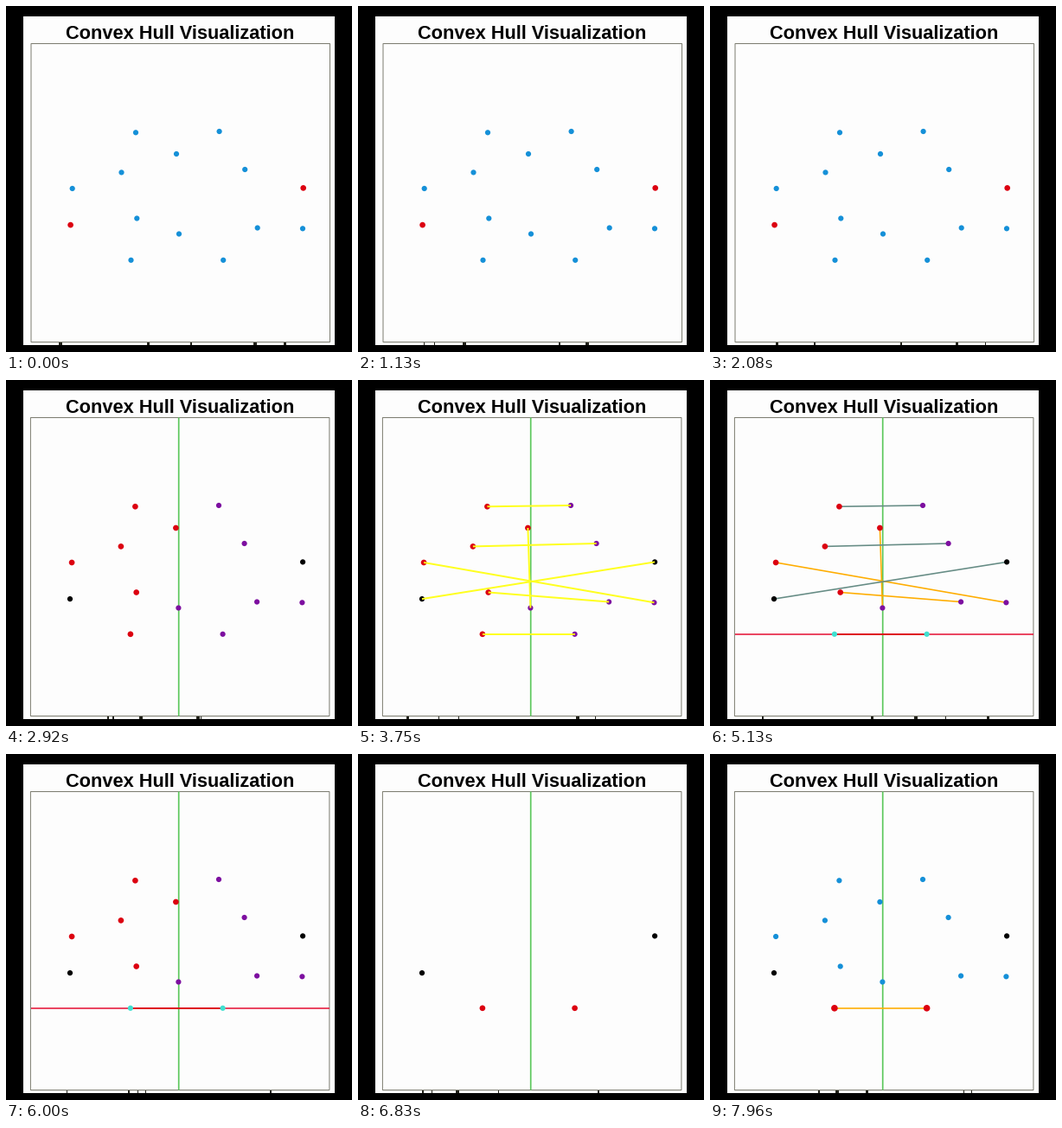
A matplotlib script that plays this animation: 400x400 px, repeating every 8000 ms.

```python
import random

import matplotlib.pyplot as plt
from matplotlib.animation import FuncAnimation
from matplotlib.patches import Rectangle

FRAMES, INTERVAL = 200, 40
STEPS = 10  # the algorithm advances in equal steps over the loop
PX = 0.72   # points per pixel at 100 dpi

BLUE, RED, PURPLE, BLACK, CYAN = "#1590d8", "#dc0010", "#7d0fa0", "black", "#40e0d0"
GREEN, YELLOW, ORANGE, SLATE = "#5cc85c", "#ffff20", "#ffad00", "#668c85"

# each left point is paired with a right one; the last two pairs are special
PAIRS = [((150, 146.3), (246.6, 145)), ((197, 171), (200, 263.5)),
         ((133.5, 192.4), (276.2, 189)), ((76.7, 211), (343, 257.3)),
         ((151.3, 245.5), (290.7, 256.5)),
         ((144.5, 293.8), (251.2, 293.8)), ((74.6, 253.1), (343.7, 210.4))]
LOW, ENDS = 5, 6
SPLIT, PAIR, SLOPE, TOUCH, KEEP, DROP, BRIDGE = range(3, STEPS)


def dot_color(pair, side, step):
    """Colour of one point, or 'none' while it is hidden."""
    if pair == ENDS:
        return RED if step < SPLIT else BLACK
    if pair == LOW and step >= TOUCH:
        return CYAN if step < DROP else RED
    if step == DROP:
        return "none"
    if SPLIT <= step < DROP:
        return (RED, PURPLE)[side]
    return BLUE


def link_color(pair, step):
    """Colour of the segment joining a pair, or None while it is hidden."""
    if step == PAIR:
        return YELLOW
    if step in (SLOPE, TOUCH) or (step == KEEP and pair == LOW):
        rise = PAIRS[pair][1][1] - PAIRS[pair][0][1]
        return RED if rise == 0 else ORANGE if rise > 0 else SLATE
    return ORANGE if step == BRIDGE and pair == LOW else None


fig = plt.figure(figsize=(4, 4), dpi=100, facecolor="black")
ax = fig.add_axes([0, 0, 1, 1])
ax.set_xlim(0, 400)
ax.set_ylim(400, 0)
ax.axis("off")

ax.add_patch(Rectangle((20, 12), 360, 380, fc="#fdfdfd", ec="none"))
frame = ax.add_patch(Rectangle((29, 43.5), 345.5, 345, fill=False,
                               ec="#7c7c70", lw=PX, snap=False, zorder=2))
ax.text(201, 37.5, "Convex Hull Visualization", ha="center", va="baseline",
        family="Liberation Sans", weight="bold", size=21.75 * PX)

divider, = ax.plot([199.7] * 2, [43.5, 388.5], color=GREEN, lw=1.7 * PX,
                   solid_capstyle="butt", snap=False, zorder=3)
tangent, = ax.plot([28.5, 374], [293.8] * 2, color="#e6193c", lw=1.6 * PX,
                   solid_capstyle="butt", zorder=4)
links = [ax.plot([], [], solid_capstyle="butt")[0] for _ in PAIRS]
dots = ax.scatter(*zip(*sum(PAIRS, ())), lw=0, zorder=5)
marks = [ax.add_patch(Rectangle((0, 389.2), 1, 2.8, fc="#202018", ec="none",
                                zorder=3)) for _ in range(5)]


def draw(i):
    step = i * STEPS // FRAMES
    shift = 0.6 if step >= SPLIT else 0
    moved = [[(x - shift, y) for x, y in pair] for pair in PAIRS]

    frame.set_x(29 - shift)
    divider.set_visible(step >= SPLIT)
    tangent.set_visible(step in (TOUCH, KEEP))

    for k, line in enumerate(links):
        color = link_color(k, step)
        line.set_visible(color is not None)
        if color:
            top = color == YELLOW
            line.set_data(*zip(*moved[k]))
            line.set(color=color, linewidth=(2 if top else 1.6) * PX,
                     zorder=6 if top else 4.5)

    colors = [dot_color(k, side, step) for k in range(len(PAIRS)) for side in (0, 1)]
    red_size = 30 if step == BRIDGE else 23
    dots.set_offsets(sum(moved, []))
    dots.set_facecolor(colors)
    dots.set_sizes([red_size if c == RED else 20 for c in colors])

    # tops of a caption cut off by the lower edge
    rng = random.Random(step)
    for mark in marks:
        mark.set_x(rng.uniform(50, 330))
        mark.set_width(rng.randint(1, 4))
    return [frame, divider, tangent, dots, *links, *marks]


anim = FuncAnimation(fig, draw, frames=FRAMES, interval=INTERVAL,
                     repeat=True, repeat_delay=0, blit=False)
plt.show()
```
